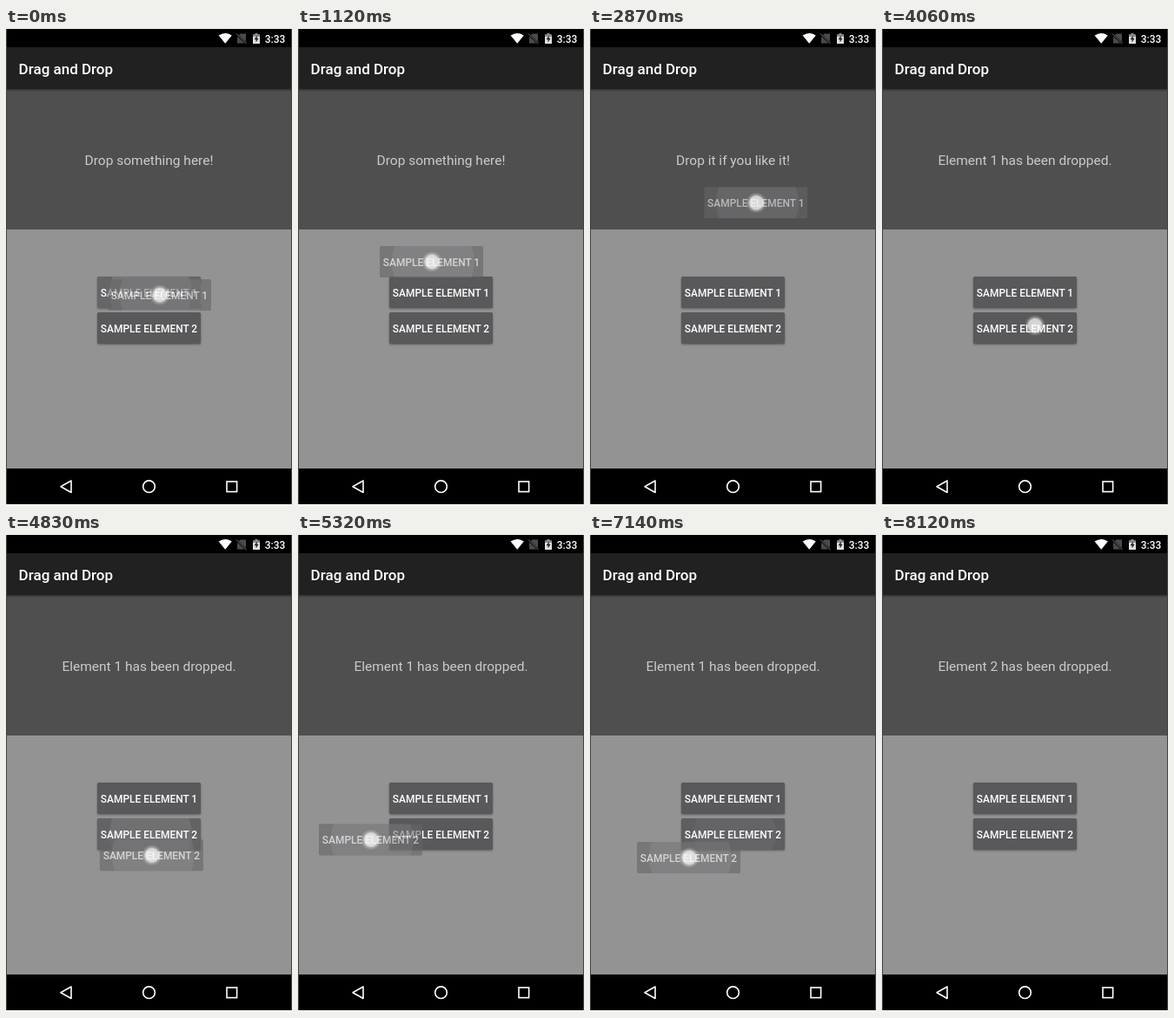
Animation of 329 by 548 pixels, one loop 9380 ms. Source, as an HTML page:

```html
<!DOCTYPE html>
<html lang="en">
<head>
<meta charset="utf-8">
<title>Drag and Drop</title>
<style>
  html, body { margin: 0; width: 100%; height: 100%; overflow: hidden; background: #fff; }
  svg { display: block; width: 100%; height: 100%; }
  text { font-family: Roboto, Arial, sans-serif; fill: #fff; }
  .label { font-size: 11.92px; font-weight: 500; text-anchor: middle; }
  .raised { filter: drop-shadow(0 1px 1px rgba(0, 0, 0, .36)); }
  .face { fill: #59585a; }
  .line { fill: none; stroke: #fff; stroke-width: 1.6; }
</style>
</head>
<body>
<svg viewBox="0 0 329 548">
  <defs>
    <radialGradient id="glow">
      <stop offset="0" stop-color="#fff" stop-opacity=".78"/>
      <stop offset=".62" stop-color="#fff" stop-opacity=".72"/>
      <stop offset=".76" stop-color="#fff" stop-opacity=".3"/>
      <stop offset="1" stop-color="#fff" stop-opacity="0"/>
    </radialGradient>
    <linearGradient id="shade" x2="0" y2="1">
      <stop offset="0" stop-opacity=".35"/>
      <stop offset="1" stop-opacity="0"/>
    </linearGradient>
    <rect id="plate" x="-59.5" y="-18" width="119" height="36" rx="1.7"/>
    <clipPath id="plateClip"><use href="#plate"/></clipPath>
  </defs>

  <!-- screen -->
  <rect y="1" width="329" height="545" fill="#444"/>
  <rect x="1" y="1" width="327" height="545"/>
  <rect x="1" y="22" width="327" height="48" fill="#212121"/>
  <rect x="1" y="70" width="327" height="161" fill="#4f4f4f"/>
  <rect x="1" y="231" width="327" height="274" fill="#939393"/>
  <rect x="1" y="70" width="327" height="3" fill="url(#shade)"/>

  <!-- status bar -->
  <path d="M244.6 8.6Q252.2 3.2 259.8 8.6L252.200 17.800Z" fill="#fff"/>
  <path d="M276 6.500V17.500H266V10L269.500 6.500Z" fill="#4a4a4a"/>
  <path d="M265 7L276.500 18" stroke="#000" stroke-width="2.4"/>
  <path d="M265 6.500L276.500 18" stroke="#777"/>
  <path d="M286.500 6H289.500V7.200H292V18H284V7.200H286.500Z" fill="#8c8c8c"/>
  <rect x="284" y="10" width="8" height="8" fill="#e0e0e0"/>
  <path d="M288.700 8.500L285.600 13.200H287.600V16.600L290.600 11.800H288.700Z" fill="#222"/>
  <text x="321.3" y="16.5" font-size="11.92" font-weight="500" text-anchor="end">3:33</text>
  <text x="14.6" y="53" font-size="17" font-weight="500">Drag and Drop</text>

  <!-- navigation bar -->
  <path class="line" d="M75 519V532.500L63 525.750Z" stroke-linejoin="round"/>
  <circle class="line" cx="164.5" cy="525.7" r="6.8"/>
  <rect class="line" x="254" y="520" width="11.6" height="11.6"/>

  <text id="message" x="164.5" y="157" font-size="15.5" text-anchor="middle" style="fill:#cbcbcb"></text>
  <g id="buttons"></g>
  <g id="ghost" opacity=".6"></g>
  <circle id="touch" r="12" fill="url(#glow)"/>
</svg>
<script>
const LOOP = 9380, TICK = 70, ZONE_BOTTOM = 231;
const RIPPLE = 47.5, HOLD = 210, FADE = 350;
const BUTTON_X = 164.5, buttonY = item => 262 + 41 * item;
const $ = id => document.getElementById(id);

// Each move runs a smooth curve through evenly timed points.
const gestures = [
  { item: 1, press: -490, lift: 0, drop: 3220, end: 3360, moves: [
    { from: 140, to: 910, points: [[177, 306], [120, 338], [71, 322], [95, 268], [154, 268]] },
    { from: 1330, to: 1680, points: [[154, 268], [165, 188]] },
    { from: 1960, to: 2310, points: [[165, 188], [171.5, 241], [173, 266]] },
    { from: 2590, to: 2940, points: [[173, 266], [194, 226], [188, 188]] }] },
  { item: 2, press: 4060, lift: 4550, drop: 5670, end: 5880, moves: [
    { from: 4690, to: 5530, points: [[176, 341], [160, 379], [118, 372], [84, 350.5], [110, 380]] }] },
  { item: 2, press: 6230, lift: 6720, drop: 7910, end: 8120, moves: [
    { from: 6790, to: 7490, points: [[163, 344], [106, 395], [114, 371], [147, 280], [169, 182]] }] }
];

const clamp = v => Math.min(1, Math.max(0, v));
const mix = (a, b, k) => a + (b - a) * k;

// Catmull-Rom spline, k from 0 to 1
function curve(points, k) {
  const last = points.length - 1;
  const i = Math.min(last - 1, Math.floor(k * last)), u = k * last - i;
  const at = n => points[Math.min(last, Math.max(0, n))];
  return [0, 1].map(axis => {
    const [a, b, c, d] = [-1, 0, 1, 2].map(n => at(i + n)[axis]);
    return b + u / 2 * (c - a + u * (2 * a - 5 * b + 4 * c - d + u * (3 * (b - c) + d - a)));
  });
}

function pointAt(moves, t) {
  const move = moves.filter(m => t >= m.from).pop() || moves[0];
  return curve(move.points, clamp((t - move.from) / (move.to - move.from)));
}

function messageAt(t, inZone) {
  if (inZone) return "Drop it if you like it!";
  if (t < gestures[0].drop) return "Drop something here!";
  return `Element ${t < gestures[2].drop ? 1 : 2} has been dropped.`;
}

const face = (item, style = "") => `
  <use href="#plate" class="face ${style}"/>
  <g class="press" clip-path="url(#plateClip)" fill="#fff">
    <use href="#plate" opacity=".08"/>
    <circle cx="1.8" r="${RIPPLE}" opacity=".105"/>
  </g>
  <text class="label" y="4.7">SAMPLE ELEMENT ${item}</text>`;

$("buttons").innerHTML = [1, 2].map(item =>
  `<g transform="translate(${BUTTON_X} ${buttonY(item)})">${face(item, "raised")}</g>`).join("");
$("ghost").innerHTML = face(1);
const presses = [...$("buttons").querySelectorAll(".press")];
const ghostLabel = $("ghost").querySelector("text");

function set(el, attrs) {
  for (const name in attrs) el.setAttribute(name, attrs[name]);
}

function setText(el, value) {
  if (el.textContent !== value) el.textContent = value;
}

function drawPress(g, t) {
  const grow = clamp((t - g.press) / (g.lift - g.press));
  const fade = clamp((g.lift + HOLD + FADE - t) / FADE);
  const [x, y] = g.moves[0].points[0];
  const press = presses[g.item - 1];
  set(press, { opacity: grow * fade });
  set(press.querySelector("circle"), {
    r: RIPPLE * grow,
    cx: mix(x - BUTTON_X, 1.8, grow),
    cy: mix(y - buttonY(g.item), 0, grow)
  });
}

function draw(time) {
  const t = Math.floor((time % LOOP) / TICK) * TICK;
  const g = gestures.find(g => t >= g.press && t < g.end);
  const [x, y] = g ? pointAt(g.moves, t) : [0, 0];
  const dragging = !!g && t >= g.lift && t < g.drop;

  presses.forEach(p => set(p, { opacity: 0 }));
  set($("ghost"), {
    visibility: dragging ? "visible" : "hidden",
    transform: `translate(${x - .5} ${y})`
  });
  set($("touch"), {
    cx: x, cy: y,
    opacity: g ? clamp((g.end - t) / (g.end - g.drop)) : 0
  });
  setText($("message"), messageAt(t, dragging && y < ZONE_BOTTOM));
  if (!g) return;
  setText(ghostLabel, `SAMPLE ELEMENT ${g.item}`);
  drawPress(g, t);
}

const start = performance.now();
function frame() {
  draw(performance.now() - start);
  requestAnimationFrame(frame);
}
frame();
</script>
</body>
</html>
```
